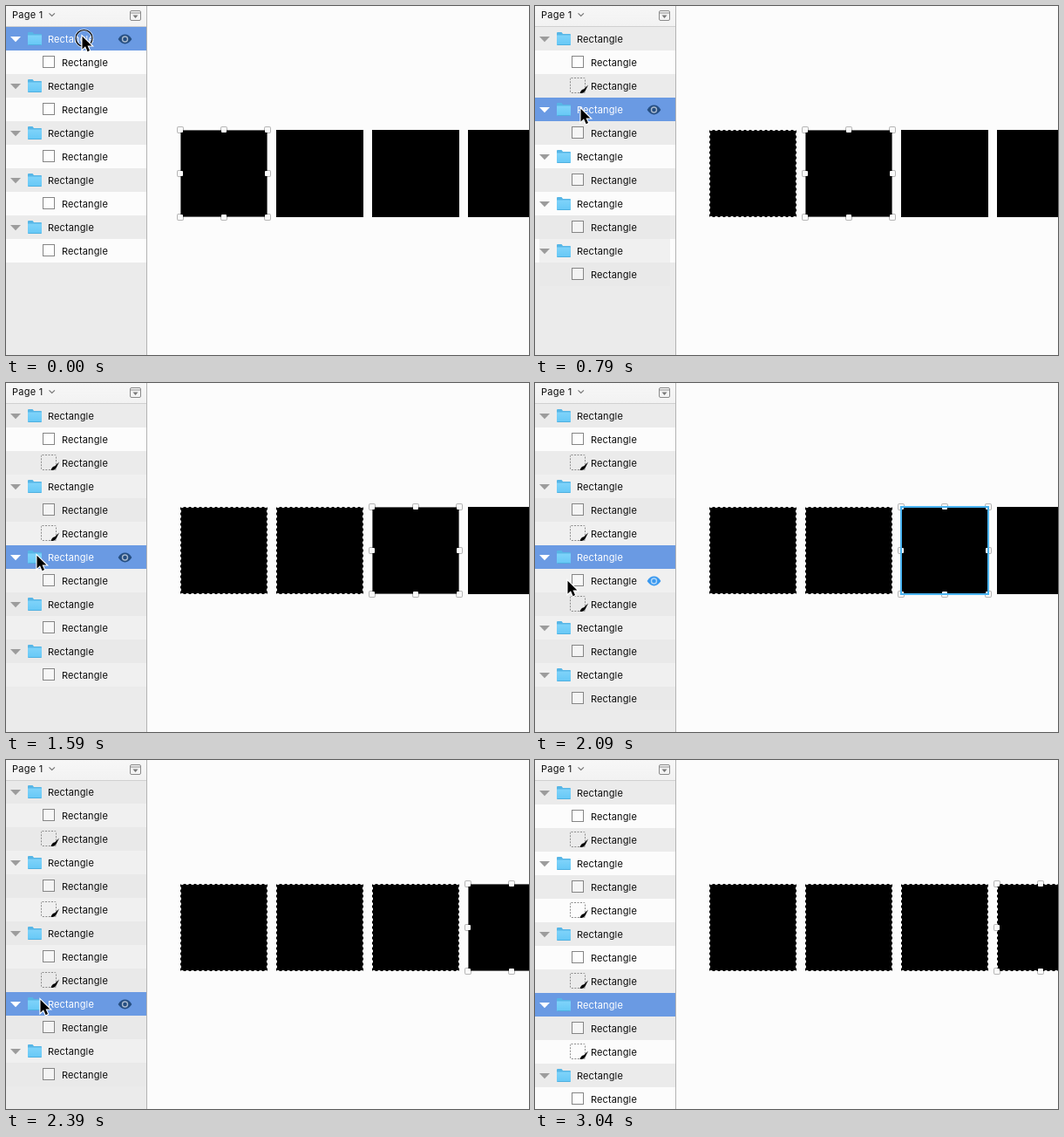
An HTML page that plays this animation: 600x400 px, repeating every 4040 ms.

```html
<!DOCTYPE html>
<html lang="en">
<head>
<meta charset="utf-8">
<title>Masking layers</title>
<style>
  html, body { margin: 0; width: 100%; height: 100%; overflow: hidden; background: #fcfcfc; }
  svg { display: block; width: 100vw; height: 100vh; }
  text { font: 11px Inter, "Open Sans", sans-serif; letter-spacing: .13px; fill: #0c0c0c; }
</style>
</head>
<body>
<svg viewBox="0 0 600 400">
  <defs>
    <linearGradient id="sky" x2="0" y2="1">
      <stop offset="0" stop-color="#7fd3fa"/>
      <stop offset="1" stop-color="#66c8f6"/>
    </linearGradient>
    <linearGradient id="bar" x2="0" y2="1">
      <stop offset="0" stop-color="#f7f7f7"/>
      <stop offset="1" stop-color="#f2f2f2"/>
    </linearGradient>
    <clipPath id="panel"><path d="M0 24H161V400H0Z"/></clipPath>
    <!-- Row icons are centred on y = 0 -->
    <path id="arrow" d="M5 -3H17L11 3.2Z"/>
    <g id="folder">
      <path d="M25 6V-7Q25 -8 26 -8H30.5L32 -6H40Q41 -6 41 -5V6Z" fill="#57b6e6"/>
      <path d="M25 -4.5H41V6Q41 7 40 7H26Q25 7 25 6Z" fill="url(#sky)"/>
      <path d="M25.5 6.5H40.5" stroke="#4fb0e0"/>
    </g>
    <rect id="box" x="42.5" y="-7.5" width="13" height="13" fill="#fff" fill-opacity=".5" stroke="#858585"/>
    <g id="mask">
      <rect x="40.5" y="-9.5" width="17" height="17" rx="1" fill="none" stroke="#8c8c8c" stroke-dasharray="2 1.5"/>
      <path d="M61 -1.5L56 3.2Q52.5 4 51.5 8Q56 8.5 57.8 5Z"/>
    </g>
    <g id="eye">
      <path d="M128.6 0Q132 -5.4 136.5 -5.4T144.4 0Q141 5.4 136.5 5.4T128.6 0Z"/>
      <circle cx="136.5" r="3.7" fill="#fff" fill-opacity=".6"/>
      <circle cx="136.5" r="2.3"/>
    </g>
    <rect id="knob" x="-3" y="-3" width="6" height="6" rx="1" stroke="#000" stroke-opacity=".28" stroke-width="2" paint-order="stroke"/>
    <path id="pointer" d="M.5 .8V15.6L4 12.3L6.6 18.2L9 17.1L6.5 11.4H11.4Z" stroke="#fff" stroke-width="2.2" paint-order="stroke"/>
  </defs>
  <rect width="600" height="400" fill="#fcfcfc"/>
  <g id="canvas"></g>
  <rect width="161" height="400" fill="#ebebeb"/>
  <g clip-path="url(#panel)"><g id="rows"></g></g>
  <rect width="161" height="23" fill="url(#bar)"/>
  <path d="M0 23.5H161" stroke="#d0d0d0"/>
  <path d="M161.5 0V400" stroke="#b3b3b3"/>
  <text x="7" y="14" style="letter-spacing:.25px">Page 1</text>
  <path d="M49.5 8.3L52.7 11.5L55.9 8.3" fill="none" stroke="#777" stroke-width="1.2"/>
  <g stroke="#8a8a8a" fill="none">
    <rect x="142.5" y="5.5" width="12" height="11" rx="1.5"/>
    <path d="M142.5 8H154.5"/>
    <path d="M145.5 10.5H151.5L148.5 14Z" fill="#777" stroke="none"/>
  </g>
  <g id="hand"></g>
</svg>
<script>
const LOOP = 4040, ROW = 27, GROUPS = 5;
const $ = id => document.getElementById(id);

// hover: [group, over its child]; dim: first row drawn with muted stripes
const steps = [
  { at: 0,    masks: 0, sel: 0, hover: [0, 0], hand: [87, 34], click: true, dim: 99 },
  { at: 500,  masks: 1, sel: 0, hover: [0, 1], hand: [70, 58], dim: 0, inset: 5 },
  { at: 640,  masks: 1, sel: 0, hover: [1, 0], hand: [48, 117], dim: 0, inset: 5 },
  { at: 790,  masks: 1, sel: 1, hover: [1, 0], hand: [52, 117], dim: 8, inset: 5 },
  { at: 1290, masks: 2, sel: 1, hover: [1, 0], hand: [33, 123], dim: 3 },
  { at: 1590, masks: 2, sel: 2, hover: [2, 0], hand: [35, 197], dim: 3 },
  { at: 2090, masks: 3, sel: 2, hover: [2, 1], hand: [37, 226], dim: 3 },
  { at: 2240, masks: 3, sel: 2, hover: [3, 0], hand: [39, 274], dim: 0, scroll: 1 },
  { at: 2390, masks: 3, sel: 3, hover: [3, 0], hand: [39, 274], dim: 0, scroll: 1 },
  { at: 2890, masks: 4, sel: 3, hover: [3, 0], hand: [45, 275], dim: 99 },
  { at: 3040, masks: 4, sel: 3, dim: 99 }
];

const use = (id, fill = "#000", x = 0, y = 0) =>
  `<use href="#${id}" x="${x}" y="${y}" fill="${fill}"/>`;

function layerList(masks) {
  const list = [];
  for (let g = 0; g < GROUPS; g++) {
    list.push({ g, kind: "folder" }, { g, kind: "box" });
    if (g < masks) list.push({ g, kind: "mask" });
  }
  return list;
}

function rowSvg({ g, kind }, i, s) {
  const head = kind === "folder";
  const on = head && g === s.sel;
  const over = s.hover && s.hover[0] === g && kind === (s.hover[1] ? "box" : "folder");
  const strip = (x, fill) =>
    `<rect x="${x}" y="-14" width="${x ? 150 : 161}" height="${ROW}" fill="${fill}"/>`;
  let out = "";
  if (on) out += strip(0, "#6a9ae3");
  else {
    const dimmed = i >= s.dim;
    if (!dimmed || s.inset) out += strip(0, i % 2 ? "#fcfcfc" : "#ebebeb");
    if (dimmed) out += strip(s.inset || 0, i % 2 ? "#f0f0f0" : "#e9e9e9");
  }
  if (head) out += use("arrow", on ? "#fff" : "#9c9c9c");
  out += use(kind);
  out += `<text x="${head ? 48 : 64}" y="4" style="fill:${on ? "#fff" : "#0c0c0c"}">Rectangle</text>`;
  if (over) out += use("eye", on ? "#264f82" : "#3b99ef");
  return `<g transform="translate(0 ${38 + i * ROW - (s.scroll || 0)})">${out}</g>`;
}

function squareSvg(g, s) {
  const x = 200 + g * 110, y = 142;
  const frame = (inset, style) =>
    `<rect x="${x + inset}" y="${y + inset}" width="${100 - 2 * inset}" height="${100 - 2 * inset}" ${style}/>`;
  let out = frame(0, "");
  if (g < s.masks) out += frame(.5, 'fill="none" stroke="#fff" stroke-dasharray="3 3"');
  if (g === s.sel) {
    if (g >= s.masks) out += frame(.5, 'fill="none" stroke="#666"');
    for (let k = 0; k < 9; k++)
      if (k !== 4) out += use("knob", "#fafafa", x + k % 3 * 50, y + Math.floor(k / 3) * 50);
  }
  if (s.hover && s.hover[0] === g && (s.hover[1] || g !== s.sel))
    out += frame(0, 'fill="none" stroke="#4ab4f2" stroke-width="2"');
  return out;
}

function handSvg(s) {
  if (!s.hand) return "";
  const [x, y] = s.hand;
  const ring = s.click
    ? `<g fill="none"><circle cx="${x + 2.5}" cy="${y + 3}" r="9.5" stroke="#fff" stroke-width="2.6" stroke-opacity=".7"/>
       <circle cx="${x + 2.5}" cy="${y + 3}" r="9.5" stroke="#000" stroke-width="1.2"/></g>` : "";
  return ring + use("pointer", "#000", x, y);
}

let shown;
function draw(t) {
  const s = steps.filter(p => p.at <= t).pop();
  if (s === shown) return;
  shown = s;
  $("rows").innerHTML = layerList(s.masks).map((row, i) => rowSvg(row, i, s)).join("");
  $("canvas").innerHTML = [0, 1, 2, 3].map(g => squareSvg(g, s)).join("");
  $("hand").innerHTML = handSvg(s);
}

const start = performance.now();
function tick() {
  draw((performance.now() - start) % LOOP);
  requestAnimationFrame(tick);
}
tick();
</script>
</body>
</html>
```
